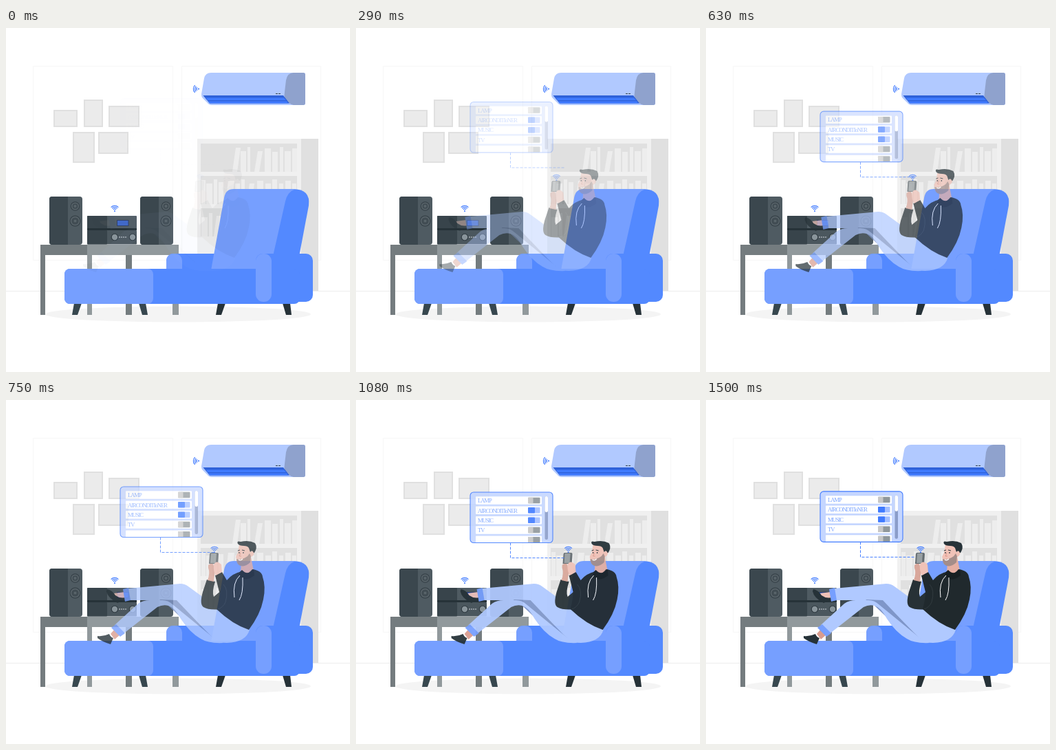
An HTML page with a canvas for the animation above (1540 ms loop, 500 by 500 pixels).

```html
<!DOCTYPE html>
<html lang="en">
<head>
<meta charset="utf-8">
<title>Smart living room</title>
<style>
html, body { margin: 0; width: 100%; height: 100%; overflow: hidden; background: #fff; }
canvas { display: block; width: 500px; height: 500px; }
</style>
</head>
<body>
<canvas id="stage" width="500" height="500"></canvas>
<script>
const LOOP = 1540;
const BLUE = '#407bff', CHAIR = '#5389ff', CHAIR_LIGHT = '#769fff';
const DARK = '#37474f', INK = '#263238', SKIN = '#f0c2b7', HOODIE = '#20292d';
const PANTS = '#b0c9ff';

const stage = document.getElementById('stage').getContext('2d');
const newLayer = () => {
  const canvas = document.createElement('canvas');
  canvas.width = canvas.height = 500;
  return canvas.getContext('2d');
};
const layer = newLayer();
const room = newLayer();
let ctx = room;

function fill(color, path) {
  ctx.fillStyle = color;
  ctx.fill(new Path2D(path));
}
function line(color, path, width = 1) {
  ctx.strokeStyle = color;
  ctx.lineWidth = width;
  ctx.stroke(new Path2D(path));
}
function box(color, x, y, w, h, r = 0) {
  ctx.fillStyle = color;
  ctx.beginPath();
  ctx.roundRect(x, y, w, h, r);
  ctx.fill();
}
function disc(color, x, y, rx, ry = rx) {
  ctx.fillStyle = color;
  ctx.beginPath();
  ctx.ellipse(x, y, rx, ry, 0, 0, Math.PI * 2);
  ctx.fill();
}
function wifi(x, y, turn = 0) {
  ctx.save();
  ctx.translate(x, y);
  ctx.rotate(turn);
  disc(BLUE, 0, 0, 1.1);
  ctx.strokeStyle = BLUE;
  ctx.lineWidth = 1.2;
  for (const r of [3, 5.3, 7.6]) {
    ctx.beginPath();
    ctx.arc(0, 0, r, -Math.PI * 0.75, -Math.PI * 0.25);
    ctx.stroke();
  }
  ctx.restore();
}

function drawShelf() {
  box('#f0f0f0', 278, 161, 151, 221);
  box('#e0e0e0', 429, 161, 25, 221);
  for (const y of [168, 215, 262]) box('#e0e0e0', 283, y, 140, 41);
  // Each book: left, shelf bottom, width, height, lean.
  const books = [
    [329, 209, 7, 35, 5], [341, 209, 8, 30, 0], [351, 209, 4, 36, 0], [361, 209, 7, 30, 5],
    [376, 209, 9, 34, 0], [387, 209, 8, 29, 0], [398, 209, 5, 36, 0], [405, 209, 9, 30, 0],
    [416, 209, 7, 34, 0], [284, 256, 6, 35, 0], [291, 256, 9, 30, 0], [302, 256, 5, 36, 0],
    [309, 256, 7, 32, 0], [319, 256, 9, 34, 4], [333, 256, 7, 30, 0], [342, 256, 5, 36, 0],
    [350, 256, 7, 30, 4], [365, 256, 9, 34, 0], [377, 256, 8, 30, 0], [387, 256, 7, 36, 0],
    [397, 256, 6, 30, 0], [406, 256, 8, 34, 0], [416, 256, 6, 30, 0],
    [284, 303, 9, 28, 0], [295, 303, 5, 34, 0], [302, 303, 7, 30, 4]
  ];
  for (const [x, y, w, h, lean] of books)
    fill('#ededed', `M${x} ${y}l${lean} ${-h}h${w}l${-lean} ${h}Z`);
}

function drawAircon() {
  fill('#b1c9ff', 'M298 65H432Q435 65 435 68V109Q435 112 432 112H299Q295 112 292 108L285 101Q284 99 284 96L288 73Q290 65 298 65Z');
  fill('#8fa2cd', 'M418 65H432Q435 65 435 68V109Q435 112 432 112H418Q410 110 405 102Q404 98 405 93L407 76Q409 65 418 65Z');
  fill('#2f62d9', 'M286.5 98H403L412 109.5H296Z');
  fill(BLUE, 'M291 101.5H404L407 105H293ZM294 106.5H408L410 109.5H296Z');
  line(DARK, 'M392 95.5h3M396 95.5h3');
  wifi(280, 88.5, -Math.PI / 2);
}

function drawSpeaker(x) {
  box('#4f5b62', x, 245, 48, 70, 4);
  box('#3b474e', x, 245, 27, 70, [4, 0, 0, 4]);
  for (const [y, r] of [[259, 6.8], [280.5, 8]]) {
    disc('#364148', x + 37.5, y, r);
    disc('#5b666c', x + 37.5, y, r - 1.2);
    disc('#414c53', x + 37.5, y, r - 2.7);
    disc('#59646a', x + 37.5, y, 2);
  }
}

function drawStereo() {
  box('#4f5b62', 118, 273, 72, 19, 1);
  box('#38444b', 118, 273, 29, 19, 1);
  box('#263238', 118, 291, 72, 3);
  box('#4b575e', 118, 294, 72, 20.5, 1);
  box('#38444b', 118, 294, 29, 20.5, 1);
  box('#2b3b63', 161, 279, 17.5, 9);
  box('#3d65c6', 162, 280, 15.5, 7);
  for (const x of [158, 184]) {
    disc('#2f3a40', x, 304, 5.3);
    disc('#89949a', x, 304, 4.2);
  }
  for (let x = 165; x < 176; x += 3) disc('#a0a8ac', x, 304, 1.1);
  wifi(158, 266);
}

function drawTable() {
  const near = '#747c7f', far = '#91999c';
  box(near, 174, 330, 9, 87);
  box(far, 242, 330, 9, 87);
  box(far, 118, 330, 7, 87);
  box(near, 50, 315, 7, 102);
  box(near, 50, 315, 68, 15);
  box(far, 118, 315, 133, 15);
}

function drawChair() {
  fill(DARK, 'M99 400H110L104 417H96ZM193 400H203L206 417H198Z');
  fill(INK, 'M308 400H319L313 417H305ZM402 400H413L415 417H407Z');
  box(CHAIR, 233, 328, 150, 40, 10);
  box(CHAIR_LIGHT, 233, 328, 23, 40, 10);
  fill(CHAIR, 'M417 234Q443 234 440 258L426 332H375L400 250Z');
  fill(CHAIR_LIGHT, 'M331 234H421Q409 238 406 252L387 336L375 352H298L317 247Q319 234 331 234Z');
  box(CHAIR, 363, 328, 83, 70, 10);
  box(CHAIR, 85, 350, 342, 51, 8);
  box(CHAIR_LIGHT, 85, 350, 129, 51, 8);
  box(CHAIR, 298, 351, 75, 30);
  box(CHAIR_LIGHT, 363, 328, 23, 70, 11);
}

function drawRoom() {
  ctx.fillStyle = '#fff';
  ctx.fillRect(0, 0, 500, 500);
  line('#f7f7f7', 'M39.5 55.5H242.5V337.5H39.5ZM255.5 55.5H457.5V337.5H255.5Z');
  line('#ededed', 'M0 382.5H500');
  drawShelf();
  const pictures = [[69, 119, 35, 25], [113, 104, 28, 40], [149, 113, 45, 31], [97, 151, 32, 45], [134, 151, 44, 32]];
  for (const [x, y, w, h] of pictures) {
    box('#e0e0e0', x, y, w, h);
    box('#ebebeb', x + 2, y + 2, w - 4, h - 4);
  }
  drawAircon();
  disc('#f4f4f4', 250, 416, 193, 11.5);
  drawTable();
  drawSpeaker(63);
  drawSpeaker(195);
  drawStereo();
  drawChair();
}

function drawLegs() {
  // far leg
  fill(SKIN, 'M166 281L181 279L183 290L171 291Z');
  fill(INK, 'M156 275Q163 276 168 284Q175 289 182 287L183 290L171 295Q157 288 155 278Z');
  fill(PANTS, 'M186 274L262 267Q269 267 274 271L318 303L363 334Q358 352 330 353L308 352L248 291H189Z');
  fill('#7f96c8', 'M232 290L257 291Q290 326 314 350L298 349L244 298Z');
  // near leg
  fill('#d99c8e', 'M161 340L167 333L175 341L167 348Z');
  fill(INK, 'M142 343Q151 344 159 340Q161 345 165 346L161 355Q148 351 142 346Z');
  fill(PANTS, 'M167 327L201 296Q208 291 218 291H236Q245 291 251 297L311 346L325 353Q303 354 292 347Q276 338 263 318Q254 301 245 299Q237 297 229 301L178 341Z');
  fill(CHAIR_LIGHT, 'M179 275L187 273L190 291L182 293ZM162 331L169 326L182 339L175 344Z');
}

function drawHead() {
  fill('#e5afa2', 'M351 237L365 228L369 248Q360 260 350 250Z');
  fill(SKIN, 'M348 210H361L365 221Q367 217 370 221Q369 227 365 228L363 236Q357 243 350 240Q344 238 344 231L343 228L346 222Z');
  fill('#a48d89', 'M344 231Q350 233 357 229Q361 227 363 223L365 227L364 236Q357 243 350 241Q344 239 344 231Z');
  fill(INK, 'M346 209Q344 204 350 206Q362 203 371 208Q374 213 372 218Q370 223 369 222Q367 217 364 221L362 215Q360 212 355 212Q348 212 346 209Z');
  disc(INK, 348, 222, 0.8, 1.1);
  disc(INK, 354, 222, 0.8, 1.1);
  line(INK, 'M346 219L349 218M352 218L356 219');
  line('#d98f80', 'M350 222L348 227H351', 0.8);
  line('#fff', 'M347 232Q350 234 353 231', 1.2);
}

function drawTorso() {
  fill('#273136', 'M301 261L313 264Q308 279 311 286L323 276V304Q304 306 296 301Q290 297 295 279Z');
  fill('#d9a79b', 'M303 240L309 236L313 247L311 264L302 262Q306 251 303 244Z');
  fill(HOODIE, 'M352 249Q358 257 367 246Q381 248 382 257Q387 271 383 290Q379 311 362 334Q338 326 315 304Q319 290 319 279L313 255L323 250L330 262Q338 252 352 249Z');
  fill('#171f22', 'M352 247Q345 252 349 257Q357 265 370 255L369 246Q360 256 352 247Z');
  line('#384247', 'M325 268Q333 276 328 294Q324 302 317 304', 0.7);
  line('#fff', 'M349 255Q338 265 341 287M353 258Q354 282 348 291', 1);
  fill('#636b70', 'M306 222H316Q318 222 318 224L317 238H304L305 224Z');
  fill('#989fa2', 'M307 223H315L314 237H306Z');
  fill(SKIN, 'M311 239Q314 234 318 236L322 239L323 250L314 255Q310 249 311 239Z');
  wifi(312, 221);
}

function drawMan() {
  drawLegs();
  drawHead();
  drawTorso();
}

function drawMenu() {
  ctx.setLineDash([4, 2]);
  line(BLUE, 'M224.5 74V96H304');
  ctx.setLineDash([]);
  box('#c5d6ff', 166, 0.5, 120, 73.5, 5);
  ctx.save();
  ctx.clip();
  ctx.font = '8.5px "Liberation Serif", serif';
  ctx.letterSpacing = '-1px';
  const rows = [['LAMP', 0], ['AIRCONDITIoNER', 1], ['MUSIC', 1], ['TV', 0], ['', 0]];
  rows.forEach(([label, on], i) => {
    const y = 6.8 + i * 14.3;
    box('#fff', 174, y, 96, 11.5, 1);
    box(on ? '#a3beff' : '#8f979b', 250, y + 1.5, 17.5, 8.5, 1);
    box(on ? BLUE : '#c7c7c7', 250, y + 1.5, on ? 10 : 7.5, 8.5, 1);
    ctx.fillStyle = '#7ba4ff';
    ctx.fillText(label, 177, y + 9);
  });
  box('#8b9dc9', 274.5, 6.5, 4.5, 63, 2);
  box('#fff', 274.5, 6.5, 4.5, 23, 2);
  ctx.restore();
  ctx.beginPath();
  ctx.roundRect(166, 0.5, 120, 73.5, 5);
  ctx.strokeStyle = BLUE;
  ctx.lineWidth = 1.1;
  ctx.stroke();
}

// Smooth curve through [time, value] points.
function follow(points, t) {
  const i = Math.max(0, points.findIndex(p => p[0] > t) - 1);
  const slope = k => {
    const a = points[Math.max(0, k - 1)], b = points[Math.min(points.length - 1, k + 1)];
    return (b[1] - a[1]) / (b[0] - a[0]);
  };
  const [t0, v0] = points[i], [t1, v1] = points[i + 1];
  const d = t1 - t0, s = (t - t0) / d, r = 1 - s;
  return r * r * (1 + 2 * s) * v0 + s * s * (3 - 2 * s) * v1
    + d * s * r * (r * slope(i) - s * slope(i + 1));
}
const menuDrop = [[0, 102], [290, 107], [460, 113], [750, 125.5], [1080, 133.5], [1330, 133.7], [1540, 132]];

function fadeLayer(draw, x, y, alpha) {
  ctx = layer;
  ctx.clearRect(0, 0, 500, 500);
  ctx.save();
  ctx.translate(x, y);
  draw();
  ctx.restore();
  stage.globalAlpha = alpha;
  stage.drawImage(layer.canvas, 0, 0);
  stage.globalAlpha = 1;
}

drawRoom();
function render(now) {
  const t = now % LOOP;
  const left = 1 - t / LOOP;
  stage.drawImage(room.canvas, 0, 0);
  fadeLayer(drawMan, -30 * left ** 1.8, 0, 1 - 0.96 * left ** 2.3);
  fadeLayer(drawMenu, 0, follow(menuDrop, t), 1 - 0.995 * left ** 1.9);
}

let start;
function tick(now) {
  start ??= now;
  render(now - start);
  requestAnimationFrame(tick);
}
render(0);
requestAnimationFrame(tick);
</script>
</body>
</html>
```
